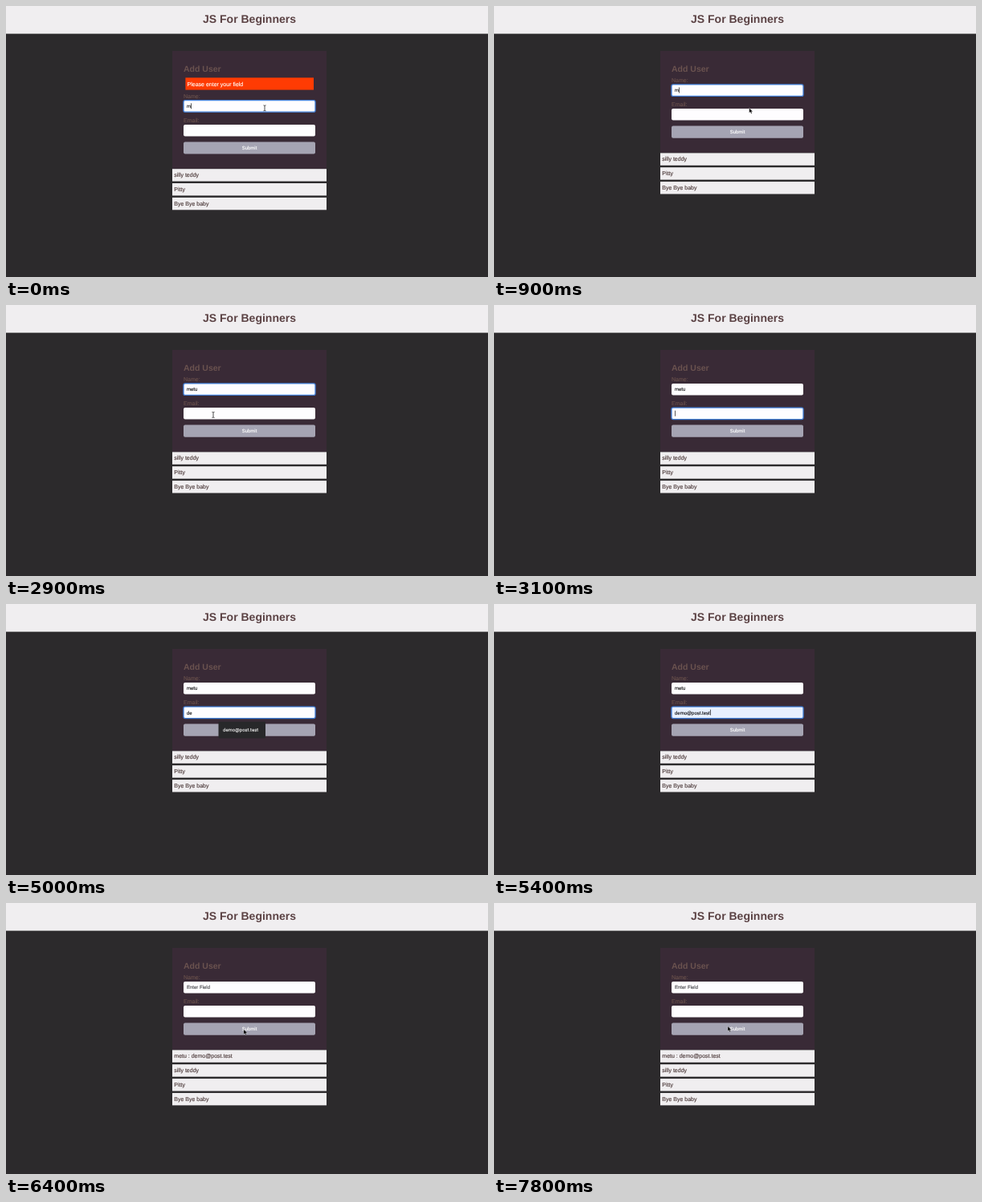
An HTML page for the animation above (8000 ms loop, 600x338 px).

```html
<!DOCTYPE html>
<html lang="en">
<head>
<meta charset="utf-8">
<title>JS For Beginners</title>
<style>
  html, body { margin: 0; width: 100%; height: 100%; overflow: hidden; background: #2c2a2c; }
  svg { display: block; width: 100vw; height: 100vh; }
  text { font: 7px "Liberation Sans", Arial, sans-serif; white-space: pre;
    text-rendering: geometricPrecision; stroke: currentColor; stroke-width: .14; fill: currentColor; }
  .title { font-size: 14px; font-weight: 700; color: #5b4244; stroke: none; }
  .heading { font-size: 10.5px; font-weight: 700; color: #6a524f; stroke: none; }
  .label { color: #6b524d; }
  .value { font-size: 6px; color: #18181a; }
  .value.hint { color: #4c4c50; }
  .button { font-size: 6px; color: #fff; }
  .alert { color: #fff; }
  .item { color: #4a3838; }
  .popup { font: 5.7px Inter, sans-serif; color: #eee; }
  .ring { fill: none; stroke: #4381da; stroke-width: 1.3; }
</style>
</head>
<body>
<svg viewBox="0 0 600 338">
  <rect width="600" height="338" fill="#2c2a2c"/>
  <rect width="600" height="34.6" fill="#f0eef0"/>
  <text class="title" x="303" y="21.3" text-anchor="middle">JS For Beginners</text>
  <rect id="panel" x="207" y="56" width="192" fill="#392a36"/>
  <text class="heading" x="221" y="82">Add User</text>
  <g id="error">
    <rect x="223.4" y="89.4" width="159.6" height="15.2" fill="#ff3b03"/>
    <text class="alert" x="225.6" y="99.5">Please enter your field</text>
  </g>
  <g id="body">
    <text class="label" x="221" y="94.8">Name:</text>
    <g id="name"></g>
    <text class="label" x="221" y="124.8">Email:</text>
    <g id="email"></g>
    <rect x="221" y="149.6" width="164" height="15.2" rx="2" fill="#a5a4b3"/>
    <text class="button" x="303" y="159.2" text-anchor="middle">Submit</text>
    <g id="list"></g>
  </g>
  <g id="popup">
    <rect x="264.5" y="146.8" width="58.5" height="20.7" rx="1" fill="#28282a"/>
    <text id="hint" class="popup" x="270" y="159"></text>
  </g>
  <path id="arrow" d="M0 0V6L1.4 4.8L2.4 6.9L3.5 6.4L2.5 4.4H4.4Z" fill="#000" stroke="#fff" stroke-width=".3"/>
  <path id="beam" d="M-1.5 -3.5Q0 -3.5 0 -2.7Q0 -3.5 1.5 -3.5M0 -2.7V2.7M-1.5 3.5Q0 3.5 0 2.7Q0 3.5 1.5 3.5" fill="none" stroke="#222" stroke-width=".8"/>
</svg>
<script>
const LOOP = 8000, STEP = 100, BLINK = 500, ROW = 17.85, ALERT = 19.8;
const NAME = "metu", MAIL = "demo@post.test";
const ITEMS = [NAME + " : " + MAIL, "silly teddy", "Pitty", "Bye Bye baby"];

const $ = id => document.getElementById(id);
const set = (el, attrs) => { for (const k in attrs) el.setAttribute(k, attrs[k]); };
const show = (el, on) => { el.style.display = on ? "" : "none"; };
const move = (el, x, y) => set(el, { transform: `translate(${x} ${y})` });
const clamp = (v, lo, hi) => Math.min(hi, Math.max(lo, v));
const ramp = (t, from, to) => clamp((t - from) / (to - from), 0, 1);
const easeOut = k => 1 - (1 - k) ** 2;

function add(parent, tag, attrs) {
  const el = document.createElementNS("http://www.w3.org/2000/svg", tag);
  set(el, attrs);
  return parent.appendChild(el);
}

function makeField(id, y) {
  const g = $(id), shape = { x: 221, y, width: 164, height: 14.5, rx: 2 };
  return {
    box: add(g, "rect", shape),
    ring: add(g, "rect", { ...shape, class: "ring" }),
    text: add(g, "text", { class: "value", x: 225, y: y + 9.5 }),
    caret: add(g, "rect", { y: y + 3.6, width: .7, height: 7, fill: "#111" })
  };
}

const nameField = makeField("name", 97.9);
const emailField = makeField("email", 128.1);
$("hint").textContent = MAIL;

const rows = ITEMS.map(label => {
  const g = add($("list"), "g", {});
  add(g, "rect", { x: 207, y: 183.4, width: 192, height: 15.4, fill: "#f0eef0" });
  add(g, "text", { class: "item", x: 209.3, y: 193.4 }).textContent = label;
  return g;
});

// One key per step; keyed is the time the caret last restarted
function typing(t, start, first, last) {
  const count = clamp(first + Math.floor((t - start) / STEP), first, last);
  return { count, keyed: start + (count - first) * STEP };
}

function drawField(f, value, focused, keyed, t, fill = "#fefdff") {
  f.text.textContent = value;
  set(f.box, { fill });
  show(f.ring, focused);
  show(f.caret, focused && Math.floor((t - keyed) / BLINK) % 2 === 0);
  set(f.caret, { x: 225.2 + (value ? f.text.getComputedTextLength() : 0) });
}

function drawPointer(t) {
  const toEmail = easeOut(ramp(t, 2000, 2700));
  const toSubmit = easeOut(ramp(t, 5500, 5800));
  const drift = ramp(t, 5800, 7800);
  const detour = Math.sin(Math.PI * ramp(t, 6900, 7400));

  show($("beam"), t < 900 || (t >= 2000 && t < 3000));
  if (t < 900) move($("beam"), 322, 127.3);
  else move($("beam"), 306 - 48 * toEmail, 129 + 8 * toEmail);

  show($("arrow"), (t >= 900 && t < 1200) || t >= 5500);
  if (t < 1200) move($("arrow"), 317.7, 127.3);
  else move($("arrow"), 314 - 16 * toSubmit - 7 * drift - 55 * detour,
    150 + 9.4 * toSubmit - 5.6 * drift + 32 * detour);
}

function draw(ms) {
  const t = Math.floor(ms / STEP) * STEP;
  const error = t < 900, sent = t >= 6200, filled = t >= 5200 && !sent;

  show($("error"), error);
  move($("body"), 0, error ? ALERT : 0);
  set($("panel"), { height: 127 + (error ? ALERT : 0) });

  const name = typing(t, 900, 1, NAME.length);
  drawField(nameField, sent ? "Enter Field" : NAME.slice(0, name.count), t < 3000,
    error ? 0 : Math.max(name.keyed, 1000) - (t < 1000 ? BLINK : 0), t);
  nameField.text.classList.toggle("hint", sent);

  const mail = typing(t, 4100, 0, 2);
  const chars = sent ? 0 : filled ? MAIL.length : mail.count;
  drawField(emailField, MAIL.slice(0, chars), t >= 3000 && !sent,
    t < 4100 ? 3000 : mail.keyed, t, filled ? "#e8f0fe" : "#fefdff");

  show($("popup"), t >= 4400 && t < 5300);
  rows.forEach((row, i) => {
    show(row, i > 0 || sent);
    move(row, 0, ROW * (sent ? i : i - 1));
  });
  drawPointer(t);
}

const start = performance.now();
function tick() {
  draw((performance.now() - start) % LOOP);
  requestAnimationFrame(tick);
}
tick();
</script>
</body>
</html>
```
